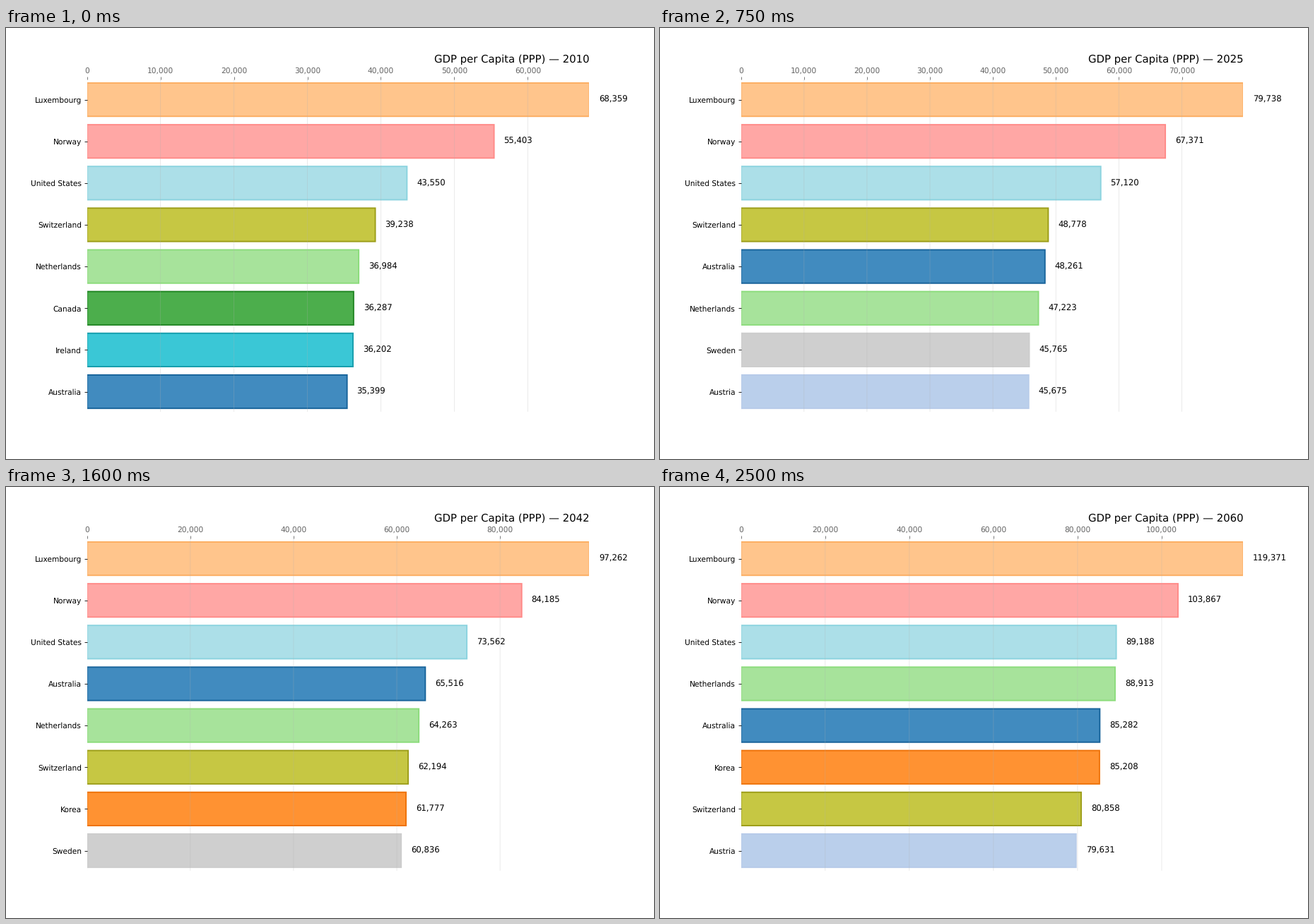
A matplotlib script for the animation above (3050 ms loop, 917 by 611 pixels).

```python
import matplotlib.pyplot as plt
import numpy as np
from matplotlib.animation import FuncAnimation

DPI = 76.4
WIDTH, HEIGHT = 917, 611
START, END = 2010, 2060
HOLD = 10  # extra ticks spent on the last year
ROWS = 8

KEY_YEARS = (START, 2015, 2042, END)

# country: fill, edge, values at the key years
COUNTRIES = {
    "Luxembourg": ("#ffbb78", "#fcae62", (68359, 69429, 97262, 119371)),
    "Norway": ("#ff9896", "#ff8a88", (55403, 57481, 84185, 103867)),
    "United States": ("#9edae5", "#8bd3df", (43550, 47449, 73562, 89188)),
    "Switzerland": ("#bcbd22", "#9c9d18", (39238, 40886, 62194, 80858)),
    "Netherlands": ("#98df8a", "#8bdc7b", (36984, 37200, 64263, 88913)),
    "Canada": ("#2ca02c", "#1f8522", (36287, 38653, 53000, 65000)),
    "Ireland": ("#17becf", "#159dac", (36202, 37272, 59900, 75000)),
    "Australia": ("#1f77b4", "#17639a", (35399, 38111, 65516, 85282)),
    "Austria": ("#aec7e8", "#b7cbe9", (35300, 37602, 59400, 79631)),
    "Sweden": ("#c7c7c7", "#cdcdcd", (34000, 36900, 60836, 76000)),
    "Korea": ("#ff7f0e", "#ee7208", (27000, 32500, 61777, 85208)),
}

plt.rcParams.update({"path.snap": False, "text.hinting": "no_hinting"})

# The tiny surplus guards against rounding down to one pixel less.
fig, ax = plt.subplots(
    figsize=((WIDTH + 1e-6) / DPI, (HEIGHT + 1e-6) / DPI), dpi=DPI)
fig.set_facecolor("white")


def ranking(year):
    """The leading countries and their values, largest first."""
    gdp = {name: np.interp(year, KEY_YEARS, values)
           for name, (_, _, values) in COUNTRIES.items()}
    return sorted(gdp.items(), key=lambda item: -item[1])[:ROWS]


def draw(frame):
    year = min(START + frame, END)
    names, values = zip(*ranking(year))
    longest = values[0]

    ax.clear()
    bars = ax.barh(range(ROWS), values, height=0.8, linewidth=1.8)
    for row, (bar, name, value) in enumerate(zip(bars, names, values)):
        fill, edge, _ = COUNTRIES[name]
        bar.set_facecolor((fill, 0.85))
        bar.set_edgecolor(edge)
        ax.text(value + 0.0195 * longest, row, f"{value:,.0f}",
                size=11, ha="left", va="center")

    ax.set_xlim(0, longest)
    ax.set_ylim(ROWS - 0.522, -0.478)
    ax.set_yticks(range(ROWS), names)
    ax.xaxis.set_ticks_position("top")
    ax.xaxis.set_major_formatter("{x:,.0f}")
    ax.tick_params(axis="x", colors="#666666")
    ax.grid(axis="x", alpha=0.3)
    ax.spines[:].set_visible(False)
    ax.set_title(f"GDP per Capita (PPP) — {year}", size=14, loc="right")


anim = FuncAnimation(fig, draw, frames=END - START + 1 + HOLD, interval=50,
                     repeat=True, repeat_delay=0)
plt.show()
```
